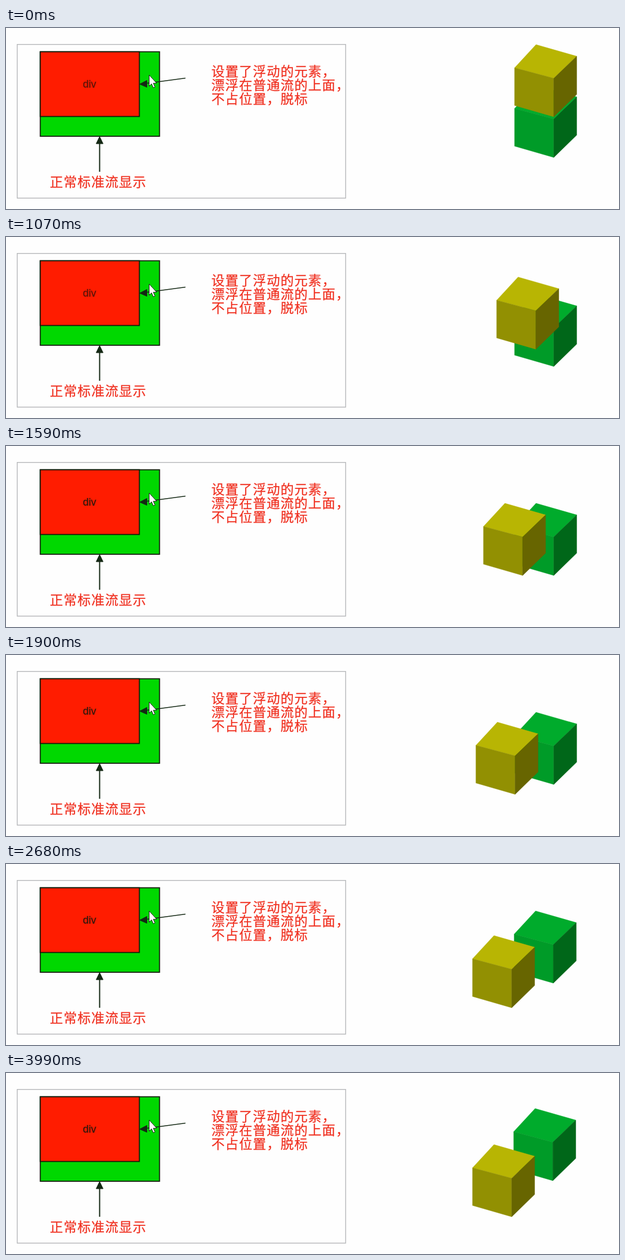
Recreate the animation shown at these times as an HTML page. Size 1064 by 316 pixels, loop 4290 ms.

```html
<!DOCTYPE html>
<html lang="zh-CN">
<head>
<meta charset="utf-8">
<title>浮动示意</title>
<style>
  html, body { margin: 0; width: 100%; height: 100%; overflow: hidden; background: #fefefe; }
  svg { display: block; width: 1064px; height: 316px; }
  .note { font: 23px "Noto Sans CJK SC", "Noto Sans CJK", sans-serif; letter-spacing: 1px; fill: #f03020; stroke: #f03020; stroke-width: .25; }
  .label { font: 18px "Liberation Sans", Arial, sans-serif; stroke-width: .3; }
  .ink { stroke: #142814; fill: #142814; }
  .top, .left, .right { stroke-width: .5; stroke-linejoin: round; }
  .yellow .top { fill: #b8b503; stroke: #b8b503; }
  .yellow .left { fill: #929002; stroke: #929002; }
  .yellow .right { fill: #676500; stroke: #676500; }
  .green .top { fill: #00ab2c; stroke: #00ab2c; }
  .green .left { fill: #009b28; stroke: #009b28; }
  .green .right { fill: #006719; stroke: #006719; }
</style>
</head>
<body>
<svg viewBox="0 0 1064 316">
  <defs>
    <!-- origin is the rear corner of the top face -->
    <g id="cube">
      <path class="top" d="M0 0L-37.2 40.5L30.8 58.8L70.6 20.3Z"/>
      <path class="left" d="M-37.2 40.5L30.8 58.8V126L-37.2 106.3Z"/>
      <path class="right" d="M30.8 58.8L70.6 20.3V87L30.8 126Z"/>
    </g>
  </defs>

  <rect x="19.5" y="28.7" width="570" height="268.3" fill="#fefefe" stroke="#b4b6b8" stroke-width="1.4"/>
  <g stroke="#101c08" stroke-width="1.8">
    <rect x="59.5" y="41.5" width="207" height="147.5" fill="#00d800"/>
    <rect x="59.5" y="41.5" width="172" height="113" fill="#ff1c00"/>
  </g>
  <text id="label" class="label" x="145" y="103.5" text-anchor="middle">div</text>

  <g class="ink">
    <path d="M311.5 87.5L244 96.5" stroke-width="1.5"/>
    <path d="M162.5 251V200" stroke-width="2"/>
    <path d="M232 98L244.5 91.5V103.5ZM162.5 189.5L156.5 202H168.5Z"/>
  </g>
  <path d="M248.5 82V101.5L252.7 97.5L255.6 104.3L258.6 103L255.7 96.4H261.5Z"
        fill="#fff" stroke="#1c1c1c"/>

  <g class="note">
    <text x="356.5" y="83.5">设置了浮动的元素，</text>
    <text x="356.5" y="108">漂浮在普通流的上面，</text>
    <text x="356.5" y="132.3">不占位置，脱标</text>
    <text x="76" y="276.7">正常标准流显示</text>
  </g>

  <g id="green" class="green"></g>
  <g id="yellow" class="yellow"></g>
</svg>
<script>
  const LOOP = 4290, START = 351, STEP = 77.2;
  const get = id => document.getElementById(id);
  const label = get("label"), green = get("green"), yellow = get("yellow");

  // Each cube colours its own copy of the faces.
  for (const cube of [green, yellow]) cube.innerHTML = get("cube").innerHTML;

  const progress = (step, from, to) => Math.min(1, Math.max(0, (step - from) / (to - from)));
  const place = (cube, x, y) => cube.setAttribute("transform", `translate(${x} ${y})`);

  function draw(now) {
    const time = now % LOOP;
    const step = Math.floor((time - START) / STEP);
    const slide = progress(step, -0.5, 21.8);
    const lift = progress(step, 21, 40);
    place(yellow, 920 - 73 * slide, 29 + 96 * slide);
    place(green, 920 - 1.6 * lift, 100 - 38 * lift);
    const ink = time < 1450 ? "#5c1408" : "#33180c";
    label.setAttribute("fill", ink);
    label.setAttribute("stroke", ink);
    requestAnimationFrame(draw);
  }
  draw(performance.now());
</script>
</body>
</html>
```
